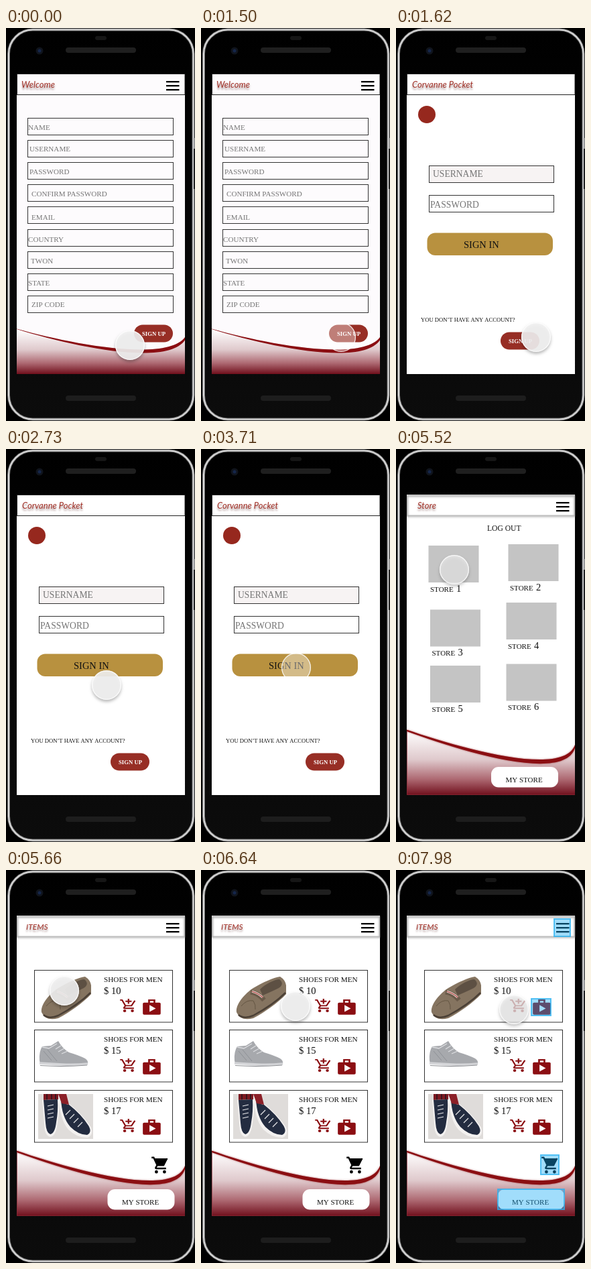
Recreate the animation shown at these times as an HTML page with a canvas. Size 282 by 586 pixels, loop 8 s.

```html
<!DOCTYPE html>
<html lang="en">
<head>
<meta charset="utf-8">
<title>Shop prototype</title>
<style>
html, body { margin: 0; width: 100%; height: 100%; overflow: hidden; background: #000; }
canvas { display: block; }
</style>
</head>
<body>
<canvas id="stage" width="282" height="586"></canvas>
<script>
const ctx = document.getElementById('stage').getContext('2d');
const LOOP = 8000;
const SERIF = '"Liberation Serif", serif';
const RED = '#972e25', DEEP = '#8b0e12', INK = '#111';

// Pointer positions, each held until the next: [ms, x, y]
const MOVES = [
  [0, 185, 473], [400, 194, 468], [550, 203, 464], [830, 206, 462], [950, 209, 461],
  [2280, 205, 448], [2430, 185, 415], [2580, 164, 378], [2730, 150, 352],
  [2880, 147, 342], [3010, 145, 335], [3150, 143, 329], [3300, 142, 326],
  [4520, 134, 306], [4660, 118, 264], [4800, 101, 217], [4940, 91, 190], [5080, 87, 180],
  [6350, 98, 187], [6490, 120, 196], [6640, 141, 203], [6770, 154, 206],
  [6910, 164, 208], [7050, 170, 209], [7180, 174, 209], [7310, 176, 208]
];
const TOUCH = [
  [0, 'idle'], [1500, 'press'], [1620, 'idle'], [3710, 'press'], [3860, 'idle'],
  [5390, 'press'], [5520, 'release'], [5660, 'idle'], [7840, 'press'], [7980, 'release']
];
const PAGES = [[0, signUp], [1620, signIn], [3860, store], [5660, items]];
const HINTS_AT = 7980;

const at = (track, t) => track.filter(key => key[0] <= t).pop();

function text(str, x, y, size, color = INK, weight = 400) {
  ctx.font = `${weight} ${size}px ${SERIF}`;
  ctx.fillStyle = color;
  ctx.fillText(str, x, y);
}

function box(x, y, w, h, color) {
  ctx.fillStyle = color;
  ctx.fillRect(x, y, w, h);
}

function frame(x, y, w, h, color = '#333', width = 1) {
  ctx.strokeStyle = color;
  ctx.lineWidth = width;
  ctx.strokeRect(x, y, w, h);
}

function pill(x, y, w, h, r, color) {
  ctx.fillStyle = color;
  ctx.beginPath();
  ctx.roundRect(x, y, w, h, r);
  ctx.fill();
}

function disc(x, y, r, color) {
  ctx.fillStyle = color;
  ctx.beginPath();
  ctx.arc(x, y, r, 0, Math.PI * 2);
  ctx.fill();
}

function shape(d, color) {
  ctx.fillStyle = color;
  ctx.fill(new Path2D(d));
}

function line(d, color, width) {
  ctx.strokeStyle = color;
  ctx.lineWidth = width;
  ctx.stroke(new Path2D(d));
}

function placed(x, y, sx, sy, draw) {
  ctx.save();
  ctx.translate(x, y);
  ctx.scale(sx, sy);
  draw();
  ctx.restore();
}

function shadow(color, blur, dy) {
  ctx.shadowColor = color;
  ctx.shadowBlur = blur;
  ctx.shadowOffsetY = dy;
}

function phone() {
  box(0, 0, 282, 586, '#000');
  const body = new Path2D();
  body.roundRect(4, 2.5, 275.5, 581, 36);
  const shade = ctx.createLinearGradient(0, 0, 0, 586);
  shade.addColorStop(0, '#000');
  shade.addColorStop(1, '#0c0c0c');
  ctx.fillStyle = shade;
  ctx.fill(body);
  ctx.strokeStyle = '#777';
  ctx.lineWidth = 4;
  ctx.stroke(body);
  ctx.strokeStyle = '#d8d8d8';
  ctx.lineWidth = 2;
  ctx.stroke(body);
  box(280, 164, 2, 16, '#999');
  box(280, 180, 2, 60, '#222');
  pill(133, 12, 17, 6, 3, '#161616');
  pill(89, 29, 105, 8, 4, '#1f1f1f');
  pill(89, 548, 105, 8, 4, '#1d1d1d');
  disc(50, 34, 5.5, '#10141c');
  disc(50, 34, 2.5, '#15264a');
}

function header(title, x, soft, size = 13) {
  if (soft) {
    ctx.save();
    shadow('#999', 3, 1);
    frame(17, 69.5, 249.5, 30, '#b8b8b8', 1.5);
    ctx.restore();
  } else {
    frame(16.5, 68.5, 250.5, 31, '#222');
  }
  ctx.save();
  shadow('rgba(90,40,40,.55)', 3, 3);
  ctx.font = `italic 400 ${size}px Lato, sans-serif`;
  ctx.fillStyle = '#a2332a';
  ctx.fillText(title, x, 89);
  ctx.restore();
}

function menu() {
  for (let y = 79; y < 92; y += 6) box(239, y, 19.5, 2.3, '#000');
}

function wave(top, edge, soft) {
  const grad = ctx.createLinearGradient(0, soft ? 420 : 450, 0, 516);
  grad.addColorStop(0, '#fff');
  grad.addColorStop(.45, '#dfc9cc');
  grad.addColorStop(.75, '#ae6a73');
  grad.addColorStop(1, '#700f1c');
  shape(`${top} V516 H16 Z`, grad);
  ctx.save();
  if (soft) shadow('rgba(139,14,18,.6)', 3, 0);
  shape(`${top} ${edge} Z`, DEEP);
  ctx.restore();
}

function softWave() {
  wave('M16 418.5 C90 444 250 491 267 441', 'V446 C250 499 90 448 16 421', true);
  line('M16.5 420 V515.5 H267', '#8a2a35', .7);
}

function myStore(x, y) {
  pill(x, y, 100, 30.5, 11, '#fff');
  text('MY STORE', x + 21.5, y + 23, 11);
}

function signUpButton(x, y) {
  pill(x, y, 58, 26, 13, RED);
  text('SIGN UP', x + 12, y + 16.5, 8.7, '#fff', 700);
}

function signUp() {
  box(16, 68, 251, 448, '#fdfbfd');
  header('Welcome', 23, false);
  menu();
  const fields = [
    ['NAME', 33, 152], ['USERNAME', 35, 184], ['PASSWORD', 35, 218],
    ['CONFIRM PASSWORD', 38, 251], ['EMAIL', 38, 286], ['COUNTRY', 33, 319],
    ['TWON', 37, 351], ['STATE', 33, 384], ['ZIP CODE', 38, 416]
  ];
  fields.forEach(([label, x, y], i) => {
    frame(32.5, Math.round(134 + 33.1 * i) + .5, 217, 25);
    text(label, x, y, 11.1, '#757575');
  });
  wave('M16 448.5 C100 472 240 498 267 461', 'V465.5 C240 505 100 475 16 449', false);
  signUpButton(191, 442.5);
}

function signIn() {
  box(16, 68, 251, 448, '#fff');
  header('Corvanne Pocket', 24, false);
  disc(46, 129, 13, '#96281e');
  box(49, 205, 187, 26, '#f7f3f3');
  frame(49.5, 205.5, 186, 25);
  frame(49.5, 249.5, 186, 25);
  text('USERNAME', 55, 222, 13.6, '#757575');
  text('PASSWORD', 51, 268, 13.6, '#757575');
  pill(46.5, 305.5, 187.5, 33.5, 12, '#b8913f');
  text('SIGN IN', 101, 328, 14.5);
  text('YOU DON’T HAVE ANY ACCOUNT?', 37, 438, 8.6);
  signUpButton(156, 453.5);
}

function store() {
  box(16, 68, 251, 448, '#fff');
  header('Store', 32, true);
  menu();
  text('LOG OUT', 136, 122, 11.6);
  const tiles = [[48.5, 144], [167.5, 142], [51, 239.5], [164.5, 229], [51, 323], [164.5, 320.5]];
  tiles.forEach(([x, y], i) => {
    box(x, y, 75, 55, '#c4c4c4');
    text('STORE', x + 2.5, y + 68.5, 11);
    text(i + 1, x + 41.5, y + 68.5, 14.5);
  });
  softWave();
  myStore(142, 474);
}

function cart(color, full) {
  line('M1 3 H3.6 L8 12 H15.8 L20.3 4 M8 12 L6.2 15 Q5.7 16 7 16 H19', color, 2);
  if (full) shape('M4.5 4 H21 L16.5 13 H8 Z', color);
  else line('M12 1 V9 M8 5 H16', color, 2);
  disc(7, 20, 2, color);
  disc(17, 20, 2, color);
}

function bag() {
  line('M9 7 V3 H15 V7', DEEP, 2);
  pill(2, 6, 20, 15, 1.5, DEEP);
  shape('M9.5 17.5 V9 L16.5 13.3 Z', '#fff');
}

function loafer() {
  shape('M53 212 C51 200 66 184 78 176 C92 168 108 160 118 159 Q126 164 127 172 L127 185 C115 198 95 212 78 221 Q59 226 53 212', '#857460');
  shape('M88 178 C96 170 110 163 117 163 Q125 170 116 176 Q106 181 92 187 Z', '#5d5043');
  line('M56 216 Q64 223 78 217 Q108 201 126 183', '#4b4036', 2.5);
  line('M74 182 Q86 184 94 194', '#6a5a49', 7);
  line('M76 181 Q86 184 92 190', '#e9e4dc', 3);
  line('M76 181 Q86 184 92 190', '#b03030', 1.2);
  line('M60 203 Q68 193 78 195 Q82 201 81 208', '#645643', 1);
}

function sneaker() {
  shape('M50 284 Q49 271 54 263 L67 262 L78 255 Q84 266 94 272 Q108 276 118 281 Q123 284 122 289 L51 289 Z', '#a7a9ad');
  line('M50 288 Q66 289 84 290 T122 289', '#d3d4d7', 3.5);
  line('M51 291.5 Q84 294 121 291', '#8f9195', 1.2);
  line('M54 264 L64 266 L76 259 M74 267 L82 262 M78 271 L87 266 M83 274 L92 270', '#dcdde0', 1.3);
  line('M56 270 L68 284 M62 268 L76 285', '#8e9196', 1);
}

function plimsolls() {
  box(48, 334, 82, 67, '#dfdcda');
  box(56, 334, 22, 9, '#7d1a22');
  line('M61 334 V343 M68 334 V343 M74 334 V343', '#26131b', 1.5);
  shape('M54 343 L79 342 Q80 360 77 376 Q75 397 66 398 Q57 396 57 378 Z', '#f3f1f0');
  shape('M56 343 L77 342 Q78 360 75 376 Q73 393 66 394 Q60 392 59 377 Z', '#232c40');
  shape('M78 336 Q84 345 92 347 Q112 362 126 382 Q132 394 122 399 Q107 400 93 387 Q80 372 78 336', '#f3f1f0');
  shape('M82 341 Q88 350 94 350 Q112 364 123 381 Q129 391 121 395 Q108 395 96 383 Q83 368 82 341', '#232c40');
  shape('M78 334 L90 334 L94 350 L83 348 Z', '#8b2028');
  for (let i = 0; i < 4; i++) {
    line(`M62 ${352 + i * 6} l9 -2 M${89 + i * 6} ${365 + i * 6} l7 -7`, '#e8e8ea', 1.2);
  }
}

function items() {
  box(16, 68, 251, 448, '#fff');
  header('ITEMS', 30, true, 12);
  menu();
  [[149, 10], [238, 15], [328, 17]].forEach(([y, price]) => {
    frame(42.5, y + .5, 206, 77.5);
    text('SHOES FOR MEN', 146, y + 18, 11.2);
    text('$ ' + price, 146, y + 35.5, 14.5);
    placed(169, y + 42, 1.15, .95, () => cart(DEEP, false));
    placed(201.5, y + 41.5, 1.33, 1.2, bag);
  });
  loafer();
  sneaker();
  plimsolls();
  softWave();
  placed(216, 425, 1.2, 1.25, () => cart('#000', true));
  myStore(151.5, 476);
}

function hints() {
  [[236, 73, 24, 26], [202, 192, 29, 25], [216, 425, 27, 29], [152, 476, 99, 30]].forEach(([x, y, w, h]) => {
    box(x, y, w, h, 'rgba(20,170,245,.4)');
    frame(x, y, w, h, 'rgba(40,178,242,.75)', 2);
  });
}

function pointer(x, y, state) {
  const look = {
    idle: ['rgba(242,242,242,.9)', .3],
    release: ['rgba(240,240,240,.72)', .3],
    press: ['rgba(255,255,255,.38)', 0]
  }[state];
  ctx.save();
  shadow(`rgba(0,0,0,${look[1]})`, 4, 3);
  disc(x, y, 22, look[0]);
  ctx.restore();
  ctx.strokeStyle = 'rgba(255,255,255,.8)';
  ctx.lineWidth = 1.3;
  ctx.beginPath();
  ctx.arc(x, y, 21.4, 0, Math.PI * 2);
  ctx.stroke();
}

function render(now) {
  const t = now % LOOP;
  const [, x, y] = at(MOVES, t);
  phone();
  ctx.save();
  ctx.beginPath();
  ctx.rect(16, 68, 251.5, 448);
  ctx.clip();
  at(PAGES, t)[1]();
  if (t >= HINTS_AT) hints();
  pointer(x, y, at(TOUCH, t)[1]);
  ctx.restore();
  requestAnimationFrame(render);
}
render(0);
</script>
</body>
</html>
```
